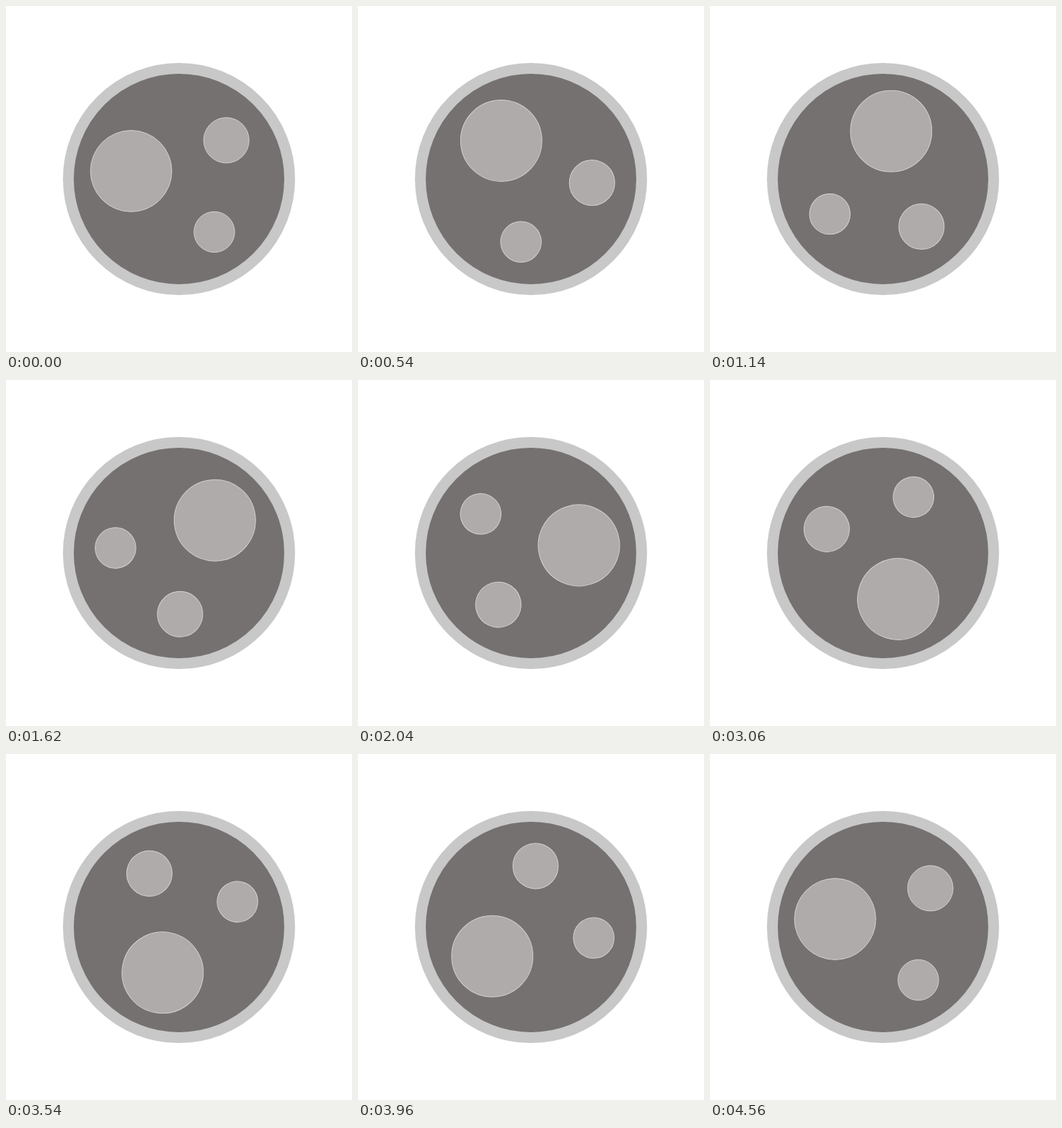
Animation, 480 px wide and 480 px high, one loop 4620 ms. Source, as an HTML page:

```html
<!DOCTYPE html>
<html>
<head>
<meta charset="utf-8">
<style>
  html, body { margin: 0; width: 100%; height: 100%; overflow: hidden; background: #fff; }
  svg { display: block; width: 100%; height: 100%; }
</style>
</head>
<body>
<svg viewBox="0 0 480 480">
  <circle cx="240" cy="240" r="153.5" fill="#757170" stroke="#c8c8c8" stroke-width="15"/>
  <g id="spots" fill="#aeabaa" stroke="#d2d1d0">
    <circle cx="173.6" cy="229" r="56.4"/>
    <circle cx="305.7" cy="186.3" r="31.5"/>
    <circle cx="289" cy="313.5" r="28.2"/>
  </g>
</svg>
<script>
  const LOOP = 4620, STEP = 60, DEGREES_PER_STEP = 4.751;
  const spots = document.getElementById('spots');

  function draw() {
    const step = Math.floor(performance.now() % LOOP / STEP);
    // The turn completes just before the last step, which rests at the start pose.
    const angle = Math.min(360, step * DEGREES_PER_STEP);
    spots.setAttribute('transform', `rotate(${angle} 240 240)`);
    requestAnimationFrame(draw);
  }
  draw();
</script>
</body>
</html>
```
